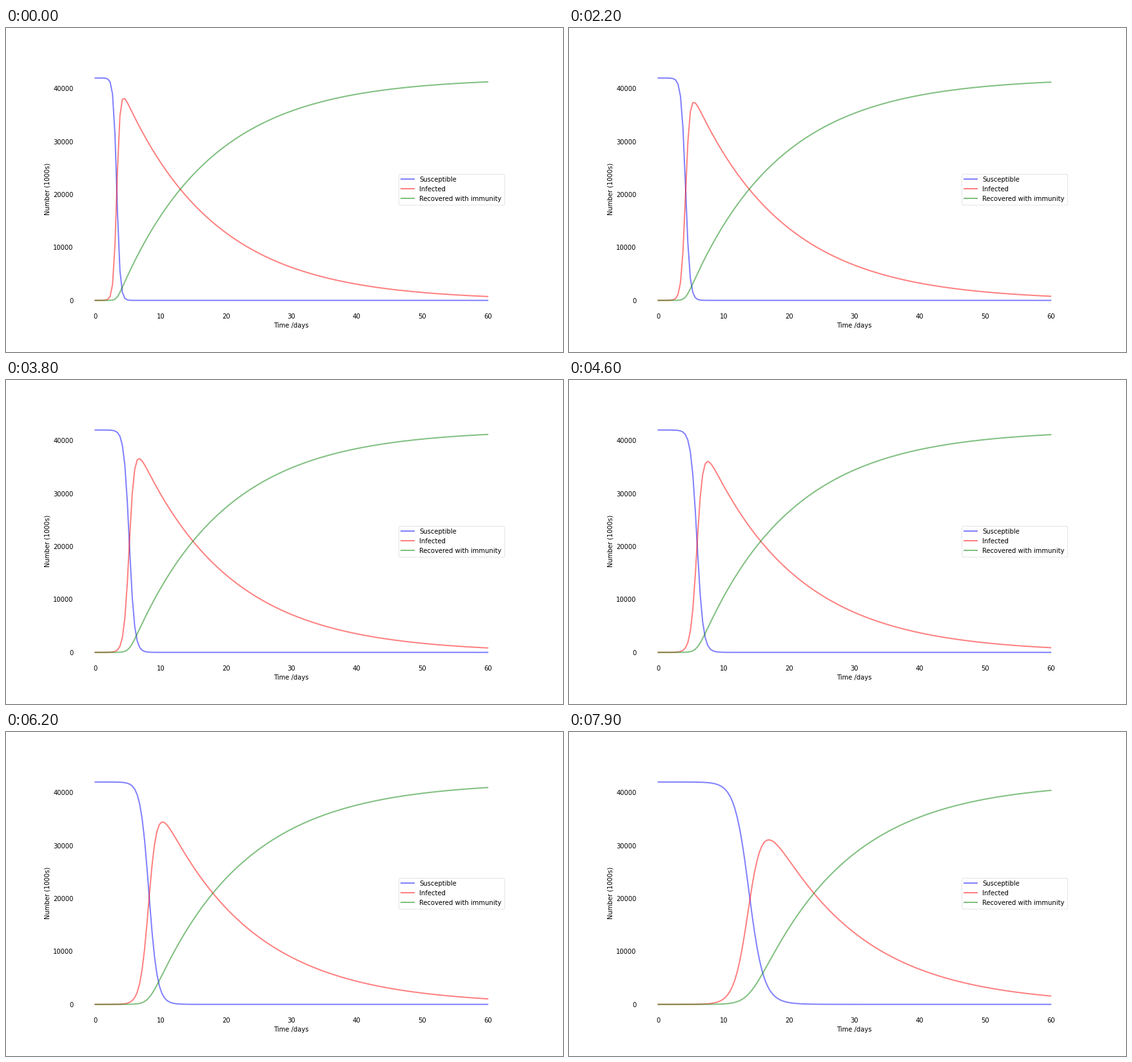
Animation, 864 px wide and 504 px high, one loop 8000 ms. Source, as a matplotlib script:

```python
import numpy as np
import matplotlib.pyplot as plt
from matplotlib.animation import FuncAnimation

FRAMES, INTERVAL = 80, 100
POPULATION, FIRST_INFECTED = 42000, 0.1
RECOVERY_RATE = 1 / 14
SUBSTEPS = 20

plt.rcParams.update({"font.family": "DejaVu Sans", "font.size": 10})

days = np.linspace(0, 60, 160)
contact_rates = np.linspace(4, 1, FRAMES)


def sir_rates(state):
    susceptible, infected, _ = state
    caught = contact_rates * susceptible * infected / POPULATION
    healed = RECOVERY_RATE * infected
    return np.array([-caught, caught - healed, healed])


def simulate():
    """Integrate the SIR model (RK4) for every contact rate at once."""
    start = [POPULATION - FIRST_INFECTED, FIRST_INFECTED, 0]
    state = np.repeat(np.array(start)[:, None], FRAMES, axis=1)
    h = (days[1] - days[0]) / SUBSTEPS
    history = [state]
    for _ in days[1:]:
        for _ in range(SUBSTEPS):
            k1 = sir_rates(state)
            k2 = sir_rates(state + h / 2 * k1)
            k3 = sir_rates(state + h / 2 * k2)
            k4 = sir_rates(state + h * k3)
            state = state + h / 6 * (k1 + 2 * k2 + 2 * k3 + k4)
        history.append(state)
    return np.array(history)


history = simulate()  # axes: day, compartment, frame

fig = plt.figure(figsize=(12, 7), dpi=72, facecolor="white")
fig.subplots_adjust(left=0.125, right=0.9, bottom=0.125, top=0.88)
ax = fig.add_subplot()
ax.set(xlim=(-3, 63), ylim=(-2100, 44100),
       xlabel="Time /days", ylabel="Number (1000s)")
ax.set_xticks(range(0, 61, 10))
ax.set_yticks(range(0, 40001, 10000))
ax.tick_params(length=0)
ax.spines[:].set_visible(False)

curves = [
    ax.plot(days, history[:, i, 0], color, alpha=0.5, lw=2, label=label)[0]
    for i, (color, label) in enumerate([
        ("b", "Susceptible"),
        ("r", "Infected"),
        ("g", "Recovered with immunity"),
    ])
]
ax.legend(loc="center right", framealpha=0.5)


def update(frame):
    for i, curve in enumerate(curves):
        curve.set_ydata(history[:, i, frame])
    return curves


animation = FuncAnimation(fig, update, frames=FRAMES, interval=INTERVAL,
                          repeat=True, repeat_delay=0)
plt.show()
```
